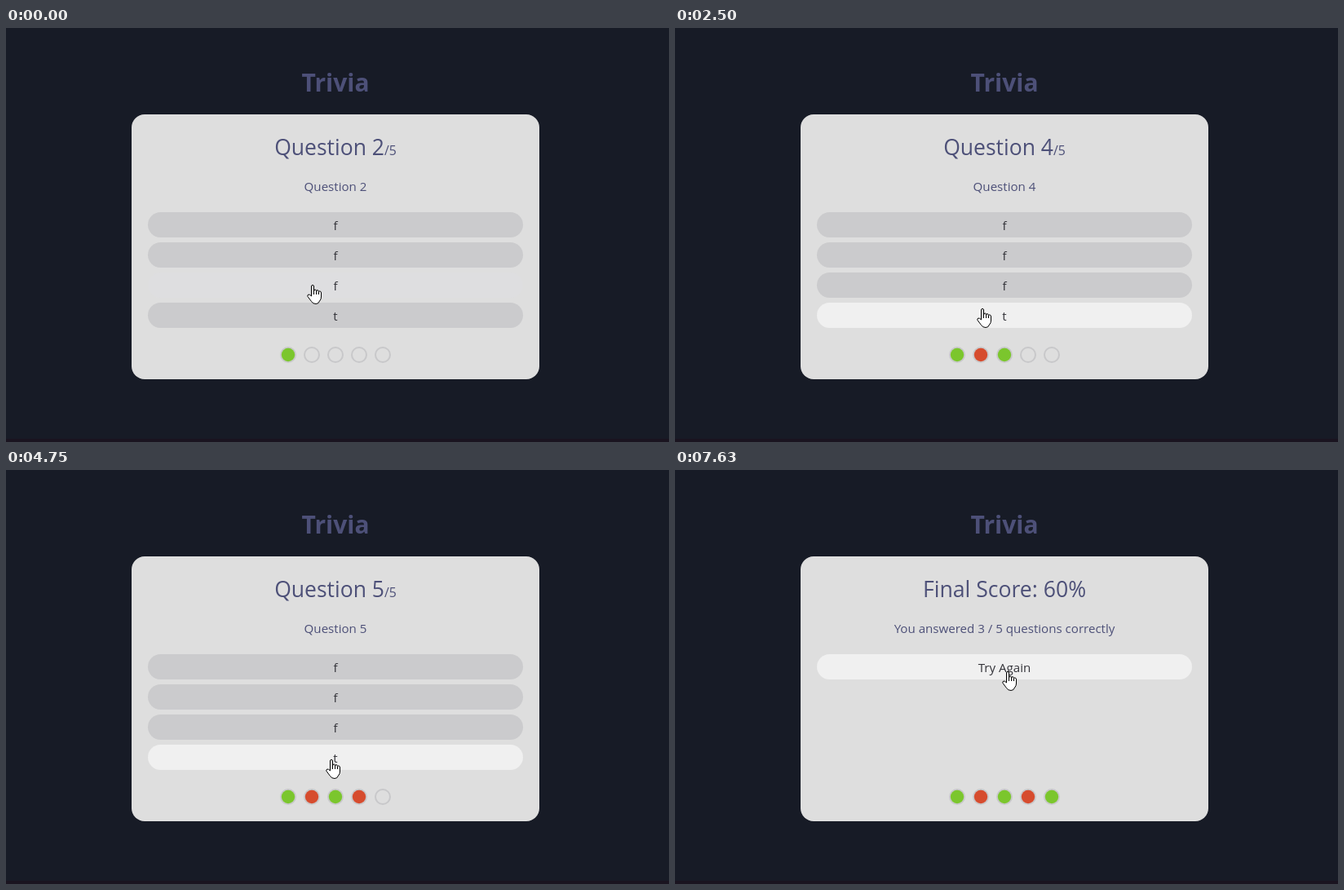
Animation of 813x508 px, one loop 8 s. Source, as an HTML page with a canvas:

```html
<!DOCTYPE html>
<html lang="en">
<head>
<meta charset="utf-8">
<title>Trivia</title>
<style>
  html, body { margin: 0; width: 100%; height: 100%; overflow: hidden; background: #171b26; }
  canvas { display: block; }
</style>
</head>
<body>
<canvas id="stage" width="813" height="508"></canvas>
<script>
const ctx = document.getElementById('stage').getContext('2d');
const LOOP = 8000, CENTER = 404, FINAL = 6;
const INK = '#4d5078', GREEN = '#7bc62d', RED = '#d64c2e';
const IDLE = '#cbcbcd', HALF = '#dedee0', HOVER = '#f0f0f0', PRESS = '#fbfbfb';
const RESULTS = [GREEN, RED, GREEN, RED, GREEN];

const handPath = new Path2D(`M5.5 2Q5.5 .5 7 .5Q8.5 .5 8.5 2V8Q8.7 6 10.2 6Q11.5 6 11.5 8
  Q11.8 6.6 13 6.7Q14.5 7 14.5 8.6Q15 7.6 16 8Q17.5 8.3 17.5 10V15Q17.5 18 15.5 20
  Q14.5 23.5 11 23.5Q7 23.5 5.5 20.5L1 14.5Q.3 12.5 2 12Q3.5 11.8 5.5 14Z
  M8.5 7V12M11.5 8V12M14.5 9V12`);
const arrowPath = new Path2D('M.5 .5V16.5L4 13L6.5 18.5L8.9 17.5L6.5 12.2H11.5Z');

// Each step lists only what changes; row is the highlighted answer (0-3).
const steps = [
  { at: 0, screen: 2, row: 2, shade: HALF, rowShift: 0, textShift: 0, pointer: handPath, pos: [369, 315] },
  { at: 120, shade: HOVER, pos: [369, 313] },
  { at: 1010, screen: 3, shade: PRESS, rowShift: 1, textShift: 1 },
  { at: 1160, shade: HOVER, rowShift: 0, textShift: 0 },
  { at: 1410, pos: [368, 313] },
  { at: 1670, row: 3, shade: HALF, pos: [369, 335] },
  { at: 1790, shade: HOVER, pos: [370, 344] },
  { at: 2350, screen: 4, shade: PRESS, rowShift: 1, textShift: 1 },
  { at: 2500, shade: HOVER, rowShift: 0, textShift: 0 },
  { at: 2870, row: 2, shade: HALF, pos: [370, 325] },
  { at: 2990, row: 1, pos: [371, 285] },
  { at: 3110, row: 0, pos: [371, 250] },
  { at: 3230, shade: '#eeeeee', pos: [371, 244] },
  { at: 4130, textShift: 1 },
  { at: 4270, screen: 5, textShift: 0 },
  { at: 4390, shade: HALF, pos: [374, 264] },
  { at: 4510, row: -1, pos: [383, 314] },
  { at: 4630, row: 3, pos: [390, 344] },
  { at: 4750, shade: HOVER, pos: [392, 355] },
  { at: 5410, screen: FINAL, row: -1 },
  { at: 5530, pointer: arrowPath, pos: [399, 355] },
  { at: 6990, pos: [402, 334] },
  { at: 7110, pos: [406, 287] },
  { at: 7230, pos: [408, 258] },
  { at: 7510, row: 0, shade: HALF, pointer: handPath, pos: [401, 250] },
  { at: 7630, shade: HOVER, pos: [401, 247] }
];

function stateAt(time) {
  return Object.assign({}, ...steps.filter(step => step.at <= time));
}

function box(x, y, w, h, radius, color) {
  ctx.fillStyle = color;
  ctx.beginPath();
  ctx.roundRect(x, y, w, h, radius);
  ctx.fill();
}

// Draws centred text with an optional smaller suffix.
function text(label, y, size, color = INK, weight = 400, suffix = '') {
  const font = px => `${weight} ${px}px "Open Sans", "Noto Sans", sans-serif`;
  ctx.font = font(15.8);
  const suffixWidth = suffix ? ctx.measureText(suffix).width : 0;
  ctx.font = font(size);
  const width = ctx.measureText(label).width;
  const x = CENTER - (width + suffixWidth) / 2;
  ctx.fillStyle = color;
  ctx.fillText(label, x, y);
  if (suffix) {
    ctx.font = font(15.8);
    ctx.fillText(suffix, x + width, y);
  }
}

function drawRows(labels, state) {
  labels.forEach((label, i) => {
    const active = i === state.row;
    const y = 226 + 37 * i;
    box(174, y + (active ? state.rowShift : 0), 460, 31, 15.5, active ? state.shade : IDLE);
    text(label, y + 22 + (active ? state.textShift : 0), 15.1, '#333339');
  });
}

function drawDots(answered) {
  RESULTS.forEach((color, i) => {
    ctx.beginPath();
    ctx.arc(346 + 29 * i, 401, 9, 0, Math.PI * 2);
    ctx.strokeStyle = '#c8c8ca';
    ctx.lineWidth = 2;
    ctx.stroke();
    if (i >= answered) return;
    ctx.beginPath();
    ctx.arc(346 + 29 * i, 401, 8.2, 0, Math.PI * 2);
    ctx.fillStyle = color;
    ctx.fill();
  });
}

function drawPointer({ pointer, pos }) {
  ctx.save();
  ctx.translate(...pos);
  ctx.fillStyle = '#fff';
  ctx.strokeStyle = '#000';
  ctx.lineWidth = 1;
  ctx.fill(pointer);
  ctx.stroke(pointer);
  ctx.restore();
}

function draw(time) {
  const state = stateAt(time);
  ctx.fillStyle = '#171b26';
  ctx.fillRect(0, 0, 813, 508);
  ctx.fillStyle = '#1a1420';
  ctx.fillRect(0, 504, 813, 4);
  text('Trivia', 78, 30, INK, 700);
  box(154, 106, 500, 325, 16, '#dedede');

  if (state.screen === FINAL) {
    text('Final Score: 60%', 156, 26.6);
    text('You answered 3 / 5 questions correctly', 200, 15.1);
    drawRows(['Try Again'], state);
  } else {
    text(`Question ${state.screen}`, 156, 26.5, INK, 400, '/5');
    text(`Question ${state.screen}`, 200, 15.1);
    drawRows(['f', 'f', 'f', 't'], state);
  }
  drawDots(state.screen - 1);
  drawPointer(state);
}

const start = performance.now();
function tick() {
  draw((performance.now() - start) % LOOP);
  requestAnimationFrame(tick);
}
tick();
</script>
</body>
</html>
```
